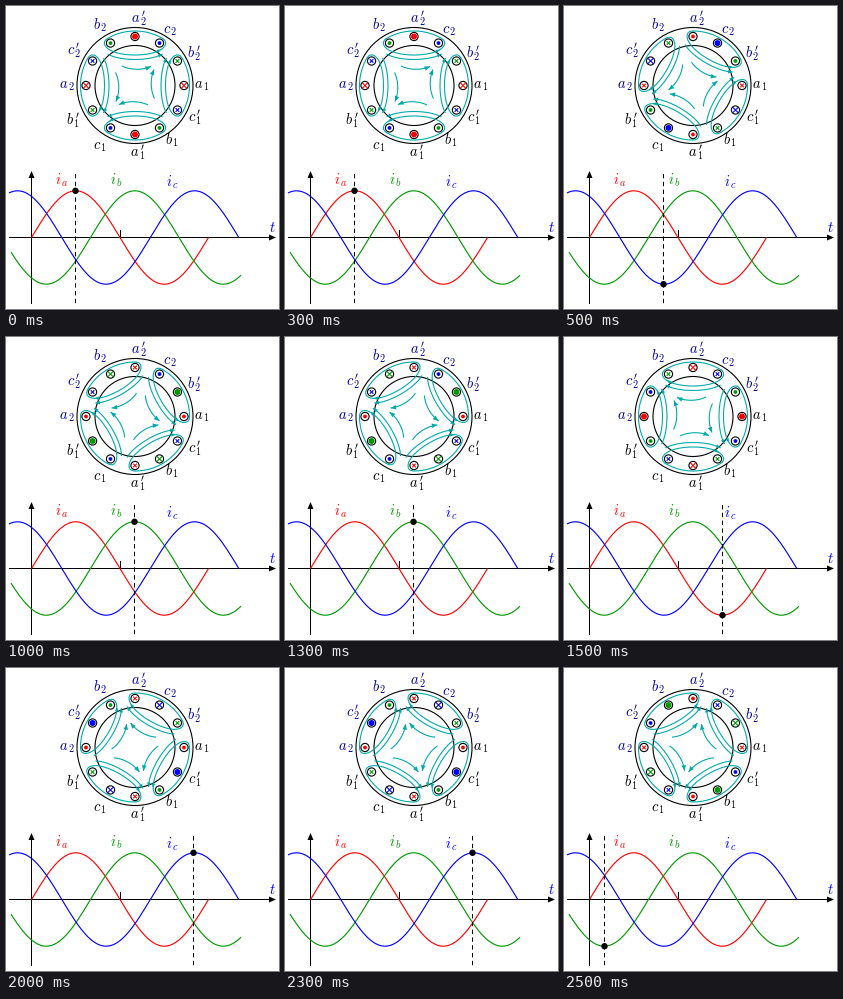
Animation of 273x303 px, one loop 3 s. Source, as a matplotlib script:

```python
import numpy as np
import matplotlib.pyplot as plt
from matplotlib.animation import FuncAnimation
from matplotlib.patches import Circle, PathPatch, Polygon
from matplotlib.path import Path

W, H = 273, 303
FRAMES, INTERVAL = 6, 500
CENTER = np.array([129, 79.5])
R_OUT, R_IN, R_SLOT = 58, 40, 49
X0, Y0, AMP, PERIOD = 25.5, 231.5, 46.7, 177
RED, GREEN, BLUE = "#ff0000", "#009900", "#0000ff"
TEAL, NAVY = "#00aaaa", "#000099"
COLORS = {"a": RED, "b": GREEN, "c": BLUE}
PHASE = {"a": 0, "b": 120, "c": 240}

# phase, coil number, return side; counterclockwise from the right
SLOTS = ["a1", "b2'", "c2", "a2'", "b2", "c2'",
         "a2", "b1'", "c1", "a1'", "b1", "c1'"]
# label centre and baseline in the same order
LABELS = [(196, 83), (188, 51), (164, 28), (133, 16), (94, 24), (68, 48),
          (61, 83), (67, 118), (94, 144), (132, 150), (166, 139), (189, 115)]

plt.rcParams["mathtext.fontset"] = "cm"
fig = plt.figure(figsize=(W / 72, H / 72), dpi=72, facecolor="white")
ax = fig.add_axes([0, 0, 1, 1])
ax.set_xlim(0, W)
ax.set_ylim(H, 0)
ax.axis("off")


def current(phase, deg):
    return np.sin(np.radians(deg - PHASE[phase]))


def polar(r, deg):
    a = np.radians(deg)
    return CENTER + r * np.array([np.cos(a), -np.sin(a)])


def line(xs, ys, color="black", width=1.0, **kw):
    kw.setdefault("solid_capstyle", "butt")
    return ax.add_line(plt.Line2D(xs, ys, color=color, lw=width,
                                  snap=False, **kw))


def arrowhead(tip, direction, length, width, color):
    tip = np.asarray(tip, float)
    d = np.asarray(direction, float)
    d = d / np.hypot(*d)
    side = np.array([-d[1], d[0]]) * width / 2
    base = tip - d * length
    return ax.add_patch(Polygon([tip, base + side, base - side], snap=False,
                                fc=color, ec="none", zorder=3))


def math_text(x, y, text, color):
    ax.text(x, y, f"${text}$", color=color, fontsize=14.5,
            ha="center", va="baseline")


def draw_static():
    for r in (R_OUT, R_IN):
        ax.add_patch(Circle(CENTER, r, fill=False, ec="black", lw=1.1))
    for i, (slot, (x, y)) in enumerate(zip(SLOTS, LABELS)):
        prime = r"^{\,\prime}" if slot.endswith("'") else ""
        math_text(x, y, rf"{slot[0]}{prime}_{{\,{slot[1]}}}",
                  NAVY if slot[1] == "2" else "black")
        ax.add_patch(Circle(polar(R_SLOT, 30 * i), 4.1, fc="white",
                            ec="black", lw=1.1, zorder=4))

    line([3, 265], [Y0, Y0])
    line([X0, X0], [298, 170])
    line([114.5, 114.5], [224, Y0])
    arrowhead((270, Y0), (1, 0), 7, 6, "black")
    arrowhead((X0, 165), (0, -1), 7, 6, "black")

    for phase, start, end, shift in (("a", X0, 202.5, 0), ("b", 5, 235, 0),
                                     ("c", 3, 233, 0.8)):
        x = np.linspace(start, end, 300)
        y = Y0 - AMP * current(phase, (x - shift - X0) / PERIOD * 360)
        line(x, y, COLORS[phase], 1.15)
    math_text(56, 179, r"i_{\,a}", RED)
    math_text(110.5, 179, r"i_{\,b}", GREEN)
    math_text(166.5, 181, r"i_{\,c}", BLUE)
    math_text(266.5, 226, "t", BLUE)


def to_stage(points, angle, sign):
    """Map points of a pole group facing up to the group at the given angle."""
    p = np.array(points, float) * [sign, 1]
    t = np.radians(angle - 90)
    x = p[:, 0] * np.cos(t) - p[:, 1] * np.sin(t)
    y = p[:, 0] * np.sin(t) + p[:, 1] * np.cos(t)
    return CENTER + np.column_stack([x, -y])


def bezier(p0, p1, p2, p3, n=30):
    t = np.linspace(0, 1, n)[:, None]
    p0, p1, p2, p3 = map(np.array, (p0, p1, p2, p3))
    return ((1 - t) ** 3 * p0 + 3 * t * (1 - t) ** 2 * p1
            + 3 * t ** 2 * (1 - t) * p2 + t ** 3 * p3)


def bow(x, y, cx, cy):
    return bezier((-x, y), (-cx, cy), (cx, cy), (x, y))


def flux_loop():
    a = np.radians(np.linspace(30, -30, 40))
    yoke = 54.5 * np.column_stack([np.sin(a), np.cos(a)])
    cap = bezier((27.2, 47.2), (31.5, 44.7), (31.5, 41.2), (28.5, 38), 12)
    inner = bow(28.5, 38, 19, 28)
    return np.vstack([inner, cap[::-1], yoke, cap * [-1, 1]])


LOOP = flux_loop()
LONG = bow(27.5, 31.5, 15, 24.2)
SHORT = bezier((-13, 19.5), (-5, 15.5), (7, 15), (16, 19))


def draw_flux(angle, sign):
    parts = []
    for pts in (LOOP, LONG, SHORT):
        path = Path(to_stage(pts, angle, sign))
        parts.append(ax.add_patch(PathPatch(path, fill=False, ec=TEAL,
                                            lw=1.1, zorder=3)))
    for pts, i, length, width in ((LOOP, 27, 4.5, 3.6), (LONG, 29, 4.5, 3.6),
                                  (SHORT, 29, 5.5, 4.6)):
        tail, tip = to_stage(pts[[i - 2, i]], angle, sign)
        parts.append(arrowhead(tip, tip - tail, length, width, TEAL))
    return parts


def draw_slot(i, deg):
    slot = SLOTS[i]
    value = current(slot[0], deg) * (-1 if slot.endswith("'") else 1)
    x, y = polar(R_SLOT, 30 * i)
    color = COLORS[slot[0]]
    size = abs(value)
    if value < 0:
        return [ax.add_patch(Circle((x, y), 0.8 + 2.2 * size, fc=color,
                                    ec="none", zorder=5))]
    h = 0.8 + 2 * size
    return [line([x - h, x + h], [y - s * h, y + s * h], color, 1.1, zorder=5)
            for s in (1, -1)]


draw_static()
cursor = line([0, 0], [168, 298], width=1.0, dashes=(4.4, 3.4), zorder=3)
marker = ax.add_patch(Circle((0, 0), 3.2, fc="black", ec="none", zorder=6))
moving = []


def update(k):
    while moving:
        moving.pop().remove()
    deg = (90 + 60 * k) % 360
    for q in range(4):
        moving.extend(draw_flux(90 - 30 * k + 90 * q, 1 if q % 2 == 0 else -1))
    for i in range(len(SLOTS)):
        moving.extend(draw_slot(i, deg))
    # keep the cursor on whole pixel columns
    x = np.floor(X0 + PERIOD * deg / 360) + 0.5
    peak = max((current(p, deg) for p in "abc"), key=abs)
    cursor.set_xdata([x, x])
    marker.center = (x, Y0 - AMP * peak)
    return [cursor, marker, *moving]


anim = FuncAnimation(fig, update, frames=FRAMES, interval=INTERVAL,
                     init_func=lambda: [], repeat=True, repeat_delay=0)
plt.show()
```
